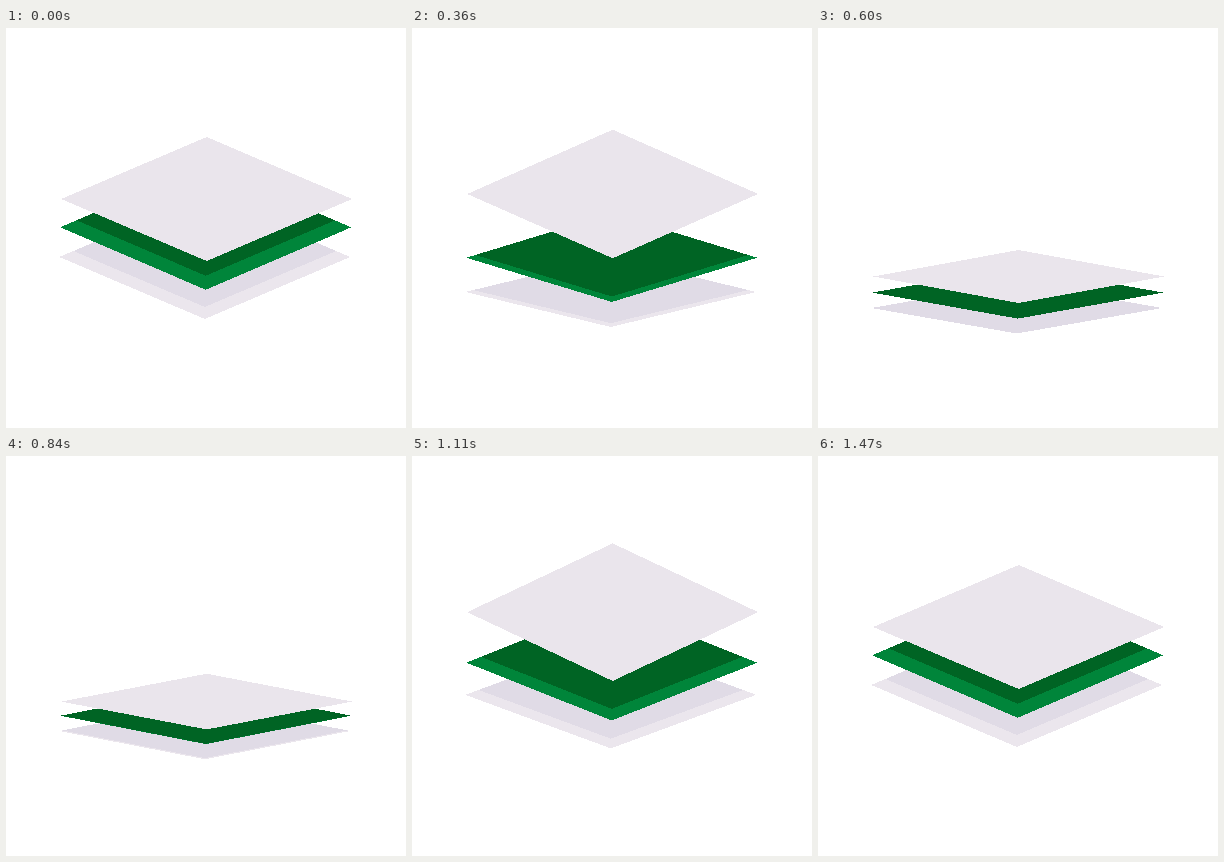
These frames come from a looping animation (400x400 px, 8000 ms). An HTML page:

```html
<!DOCTYPE html>
<html lang="en">
<head>
<meta charset="utf-8">
<title>Stacked layers</title>
<style>
  html, body { margin: 0; width: 100%; height: 100%; overflow: hidden; background: #fff; }
  svg { display: block; width: 100%; height: 100%; }
</style>
</head>
<body>
<svg id="stage" viewBox="0 0 400 400" shape-rendering="crispEdges"></svg>
<script>
const LOOP = 8000, STEP = 30, HALF_WIDTH = 145.5;
const NS = 'http://www.w3.org/2000/svg';
const stage = document.getElementById('stage');

const sine = u => (1 - Math.cos(Math.PI * u)) / 2;
const cubic = u => u < 0.5 ? 4 * u ** 3 : 1 - 4 * (1 - u) ** 3;
const cubicOut = u => 1 - (1 - u) ** 3;
const gather = u => u ** 1.5;

// Pose 0 is the raised stack, pose 1 the flat one; below 0 a layer overshoots.
// y: centre, h: half height, bow: how far h sags between the poses,
// rim: height of the lit edge, fade: how fast the rim shrinks.
const layers = [
  { x: 198.8, y: [229, 280], h: [62, 25.5], bow: 9, rim: 12, fade: 1,
    lit: '#ebe6ed', shade: '#e0dbe6',
    moves: [
      { from: 0, to: 580, pose: 1, ease: sine },
      { from: 752, to: 1255, pose: -0.345, ease: gather },
      { from: 1260, to: 1470, pose: 0, ease: sine }
    ] },
  { x: 199.8, y: [199.3, 264.6], h: [62.5, 26], bow: 5, rim: 14, fade: 1.5,
    lit: '#00853a', shade: '#006424',
    moves: [
      { from: 140, to: 600, pose: 1, ease: sine },
      { from: 754, to: 1283, pose: -0.17, ease: sine },
      { from: 1283, to: 1470, pose: 0, ease: sine }
    ] },
  { x: 200.7, y: [171, 248.5], h: [62, 26.5], bow: 0, rim: 0, fade: 1,
    lit: '#eae5ec',
    moves: [
      { from: 0, to: 240, pose: -0.25, ease: sine },
      { from: 240, to: 600, pose: 1, ease: cubic },
      { from: 800, to: 1160, pose: -0.25, ease: sine },
      { from: 1160, to: 1470, pose: 0, ease: cubicOut }
    ] }
];

function addPath(fill) {
  const p = document.createElementNS(NS, 'path');
  p.setAttribute('fill', fill);
  return stage.appendChild(p);
}

for (const layer of layers) {
  layer.base = addPath(layer.lit);
  if (layer.shade) layer.cover = addPath(layer.shade);
}

const mix = ([a, b], u) => a + (b - a) * u;
const clamp = u => Math.min(1, Math.max(0, u));

function poseAt(moves, t) {
  let p = 0;
  for (const { from, to, pose, ease } of moves) {
    p = mix([p, pose], ease(clamp((t - from) / (to - from))));
  }
  return p;
}

// Diamond whose lower edges are raised by cut
function diamond(x, y, h, cut = 0) {
  const k = cut / (2 * h), w = HALF_WIDTH * (1 - k), side = y - h * k;
  return `M${x} ${y - h}L${x + w} ${side}L${x} ${y + h - cut}L${x - w} ${side}Z`;
}

function draw(t) {
  for (const layer of layers) {
    const p = poseAt(layer.moves, t);
    const y = mix(layer.y, p);
    const h = mix(layer.h, p) - layer.bow * Math.abs(p) * (1 - p);
    layer.base.setAttribute('d', diamond(layer.x, y, h));
    if (layer.cover) {
      const rim = layer.rim * clamp(1 - p) ** layer.fade;
      layer.cover.setAttribute('d', diamond(layer.x, y, h, rim));
    }
  }
}

const start = performance.now();
function tick() {
  const t = (performance.now() - start) % LOOP;
  draw(Math.floor(t / STEP) * STEP);
  requestAnimationFrame(tick);
}
tick();
</script>
</body>
</html>
```
